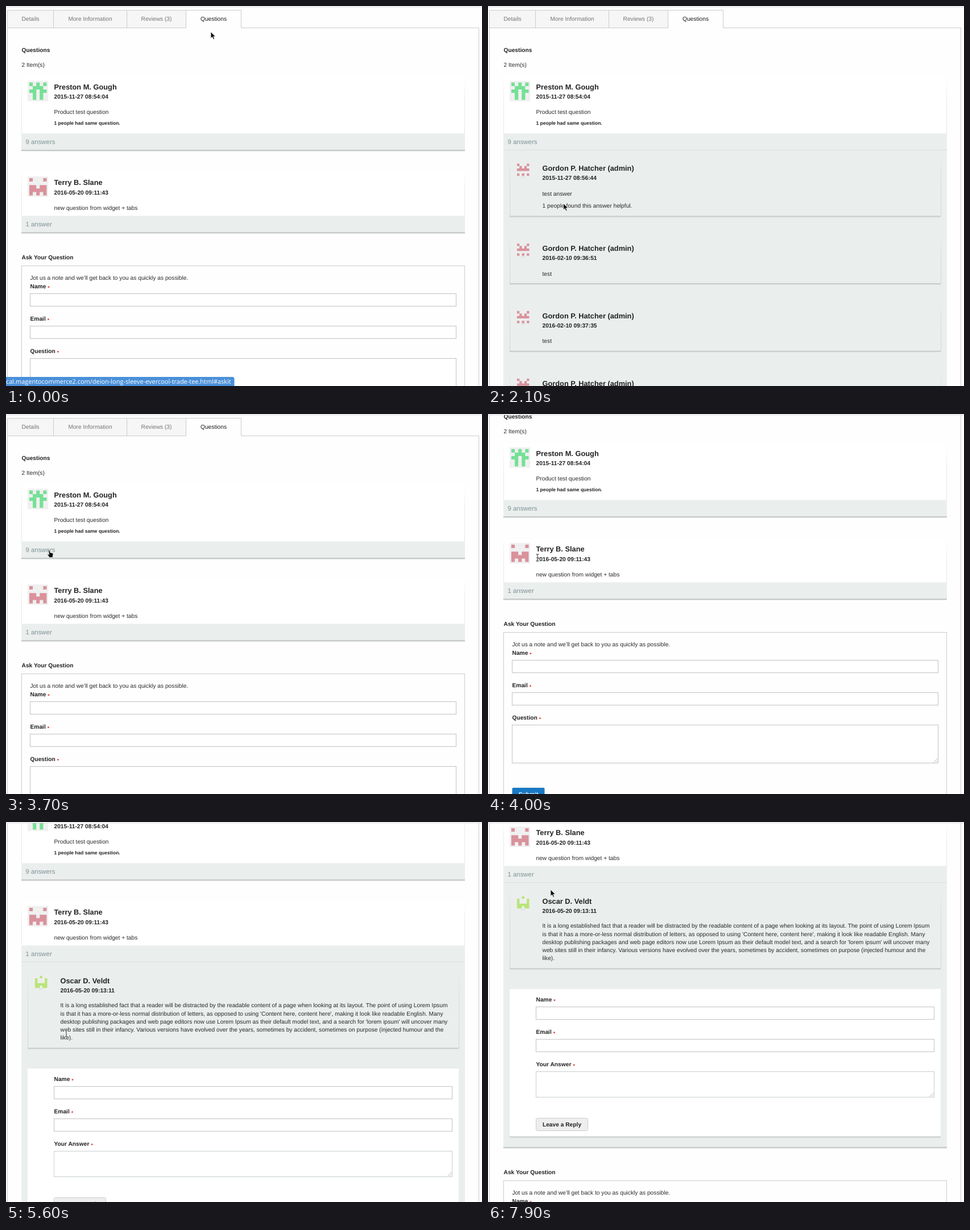
An HTML page for the animation above (8 s loop, 837 by 669 pixels).

```html
<!DOCTYPE html>
<html lang="en">
<head>
<meta charset="utf-8">
<title>Product questions</title>
<style>
html, body { margin: 0; width: 100%; height: 100%; overflow: hidden; background: #fefefe; }
svg { display: block; width: 100%; height: 100%; }
text { font: 10.23px "Liberation Sans", Arial, sans-serif; fill: #2b2b2b; text-rendering: geometricPrecision; white-space: pre; }
.b { font-weight: 700; fill: #222; }
.name { font-size: 12.8px; font-weight: 700; fill: #222; }
.small { font-size: 8.5px; font-weight: 700; fill: #222; }
.bar { font-size: 11.4px; fill: #7f9295; }
.tab { fill: #757575; }
.on { fill: #1c1c1c; }
.white { fill: #fff; font-weight: 700; }
.url { font: 10.96px "Open Sans", "Noto Sans", sans-serif; fill: #fff; }
.star { font-size: 8.8px; fill: #e02b27; }
.field { fill: #fff; stroke: #c2c2c2; }
</style>
</head>
<body>
<svg id="stage" viewBox="0 0 837 669" preserveAspectRatio="none"></svg>
<script>
const PANEL = '#eaeeed';
const OPEN_1 = 1390, OPEN_2 = 466, LOOP = 8000;

const rect = (x, y, w, h, fill, extra = '') =>
  `<rect x="${x}" y="${y}" width="${w}" height="${h}" fill="${fill}" ${extra}/>`;
const text = (x, y, s, cls = '', extra = '') =>
  `<text x="${x}" y="${y}" class="${cls}" ${extra}>${s}</text>`;
const line = (d, color) => `<path d="${d}" fill="none" stroke="${color}"/>`;

// Pixel avatar built from five rows of five cells
function avatar(x, y, cell, rows, color) {
  let d = '';
  rows.split('/').forEach((row, j) => [...row].forEach((c, i) => {
    if (c === 'X') d += `M${x + i * cell} ${y + j * cell}h${cell}v${cell}h${-cell}z`;
  }));
  return `<path d="${d}" fill="${color}"/>`;
}
const ICONS = {
  arch: ['X.X.X/.XXX./XX.XX/.X.X./.X.X.', '#75e096'],
  mask: ['X...X/...../XX.XX/XXXXX/X.X.X', '#d9929c'],
  crab: ['X...X/.X.X./XXXXX/...../X.X.X', '#d9929c'],
  fort: ['..X../X...X/X...X/XXXXX/XX.XX', '#b9e577']
};

const shade = (x1, x2, y, h) =>
  rect(x1, y, 1, h, 'url(#side)') + rect(x2 - 1, y, 1, h, 'url(#side)');
const shadow = (x, y, w) =>
  rect(x, y - 1, w, 2, '#c6cac9') + rect(x, y + 1, w, 1, '#e3e5e4');

function label(x, y, s) {
  return text(x, y, `${s}<tspan class="star" dx="3" dy="2">*</tspan>`, 'b');
}
function field(x, y, w, h, color = '#c2c2c2') {
  return `<rect x="${x}" y="${y}" width="${w}" height="${h}" class="field" style="stroke:${color}"/>`;
}
function area(x, y, w, h, color) {
  const r = x + w - 1, b = y + h - 1;
  return field(x, y, w, h, color) + line(`M${r - 7} ${b}l7 -7M${r - 3} ${b}l3 -3`, '#bbb');
}

function question(y, name, date, body, icon, barY, count) {
  return rect(27, y, 780, barY - y, '#fff') + shade(27, 807, y, barY - y) +
    rect(38, y + 7, 36, 36, '#f0f0f0') + avatar(41, y + 10, 6.1, ...ICONS[icon]) +
    text(84.5, y + 22.2, name, 'name') + text(84.5, y + 38.5, date, 'b') + body +
    rect(27, barY, 780, 30, PANEL) + text(34.5, barY + 18.7, count, 'bar') +
    rect(27, barY + 29, 780, 1, '#d0d5d4');
}

function answer(nameY, bottom, name, date, icon, lines) {
  const top = nameY - 24;
  return shade(38, 797, top, bottom - top) + rect(47, nameY - 16, 29, 29, '#eceeee') +
    avatar(51, nameY - 13, 4.3, ...ICONS[icon]) + rect(58, nameY + 10, 7, 1, '#d2d6d5') +
    text(95.5, nameY - .3, name, 'name') + text(95.5, nameY + 15.8, date, 'b') +
    lines.map(([dy, s]) => text(95.5, nameY + dy, s)).join('') + shadow(38, bottom, 758);
}

function tabs() {
  const names = ['Details', 'More Information', 'Reviews (3)'], xs = [2.5, 83.5, 212.5, 316.5];
  return names.map((s, i) =>
    rect(xs[i], 7.5, xs[i + 1] - xs[i], 31, '#f6f6f6', 'stroke="#ccc"') +
    text((xs[i] + xs[i + 1]) / 2, 26, s, 'tab', 'text-anchor="middle"')).join('') +
    line('M2.5 1500V38.5H316.5V7.5H413.5V38.5H831.5V1500', '#ccc') +
    text(365, 26, 'Questions', 'on', 'text-anchor="middle"');
}

function answers1() {
  const dates = ['2015-11-27 08:56:44', '2016-02-10 09:36:51', '2016-02-10 09:37:35', '2016-02-10 09:38:12'];
  return rect(27, 254, 780, OPEN_1, PANEL) + dates.map((date, i) => {
    const y = i ? 312.5 + 118.8 * i : 290.5;
    const lines = i ? [[43.3, 'test']] : [[43, 'test answer'], [64.7, '1 people found this answer helpful.']];
    return answer(y, y + (i ? 57.8 : 80), 'Gordon P. Hatcher (admin)', date, 'crab', lines);
  }).join('');
}

function answers2() {
  const lines = [
    'It is a long established fact that a reader will be distracted by the readable content of a page when looking at its layout. The point of using Lorem Ipsum',
    "is that it has a more-or-less normal distribution of letters, as opposed to using 'Content here, content here', making it look like readable English. Many",
    "desktop publishing packages and web page editors now use Lorem Ipsum as their default model text, and a search for 'lorem ipsum' will uncover many",
    'web sites still in their infancy. Various versions have evolved over the years, sometimes by accident, sometimes on purpose (injected humour and the',
    'like).'
  ].map((s, i) => [42.5 + 14.25 * i, s]);
  return rect(27, 399, 780, OPEN_2, PANEL) +
    answer(435.8, 550.5, 'Oscar D. Veldt', '2016-05-20 09:13:11', 'fort', lines) +
    rect(38, 586, 758, 260, '#fff') + shadow(38, 846.5, 758) +
    label(84.5, 607.5, 'Name') + field(84.5, 617.5, 700, 22) +
    label(84.5, 664.8, 'Email') + field(84.5, 674.5, 700, 22) +
    label(84.5, 722, 'Your Answer') + area(84.5, 731.5, 700, 45, '#c6d0ce') +
    `<rect id="reply" x="84.5" y="813.5" width="91" height="22" rx="2" stroke="#ccc"/>` +
    text(130, 828, 'Leave a Reply', 'b', 'text-anchor="middle"');
}

function askForm() {
  return shadow(27, 399, 780) + text(27.5, 445.8, 'Ask Your Question', 'b') +
    rect(27.5, 457.5, 779, 330, 'none', 'stroke="#ccc"') +
    text(42.5, 482.3, 'Jot us a note and we’ll get back to you as quickly as possible.') +
    label(42.5, 496.6, 'Name') + field(42.5, 506.5, 749, 22) +
    label(42.5, 554, 'Email') + field(42.5, 563.5, 749, 22) +
    label(42.5, 611, 'Question') + area(42.5, 620.5, 749, 67) +
    rect(42.5, 731, 57, 24, '#1979c3', 'rx="2"') +
    text(71, 746, 'Submit', 'white', 'text-anchor="middle"');
}

const clip = (id, y) =>
  `<clipPath id="${id}"><rect x="0" y="${y}" width="837" height="0"/></clipPath>`;

document.getElementById('stage').innerHTML = `
<defs>
  <linearGradient id="side" x2="0" y2="1">
    <stop offset="0" stop-color="#000" stop-opacity="0"/>
    <stop offset=".4" stop-color="#000" stop-opacity=".08"/>
    <stop offset="1" stop-color="#000" stop-opacity=".09"/>
  </linearGradient>
  ${clip('clip1', 254)}${clip('clip2', 399)}
</defs>
${rect(0, 0, 837, 669, '#fefefe')}
<g id="page">
  ${tabs()}
  ${text(27.5, 81, 'Questions', 'b')}${text(27.5, 107, '2 Item(s)')}
  ${question(124.8, 'Preston M. Gough', '2015-11-27 08:54:04',
    text(84.5, 189.7, 'Product test question') + text(84.5, 208.8, '1 people had same question.', 'small'),
    'arch', 224.5, '9 answers')}
  <g clip-path="url(#clip1)">${answers1()}</g>
  <g id="below1">
    ${shadow(27, 254, 780)}
    ${question(293, 'Terry B. Slane', '2016-05-20 09:11:43',
      text(84.5, 358.6, 'new question from widget + tabs'), 'mask', 369.5, '1 answer')}
    <g clip-path="url(#clip2)">${answers2()}</g>
    <g id="below2">${askForm()}</g>
  </g>
</g>
${rect(0, 0, 837, 1, '#fefefe')}${rect(0, 1, 837, 1, '#d8d8d8')}
<g id="status">
  <path d="M0 653H398q3.500 0 3.500 3.500V669H0z" fill="#4a90d9"/>
  ${text(0, 665, 'cal.magentocommerce2.com/deion-long-sleeve-evercool-trade-tee.html#askit', 'url')}
</g>
<g id="cursor" stroke-linejoin="round">
  <path id="arrow" d="M0 0V11.500L2.700 9L4.600 13.300L6.600 12.400L4.800 8.300H8.500z" fill="#111" stroke="#fff" stroke-width=".8"/>
  <path id="hand" d="M1.500 1.200q1.200 -1.600 2.300 .3l.9 3.300l4.300 1q1.300 .5 1.100 2.200l-.8 3.700v2H3.300l-3.300 -5q-.4 -1.700 1.200 -1.200l1.500 1.200z" fill="#111" stroke="#fff" stroke-width=".8"/>
  <g id="beam">
    <path d="M-2.500 -6H2.500M0 -6V6M-2.500 6H2.500" stroke="#fff" stroke-width="2.600"/>
    <path d="M-2.500 -6H2.500M0 -6V6M-2.500 6H2.500" stroke="#333" stroke-width="1.100"/>
  </g>
</g>`;

const $ = id => document.getElementById(id);
const clamp = v => Math.max(0, Math.min(1, v));
const swing = p => .5 - Math.cos(Math.PI * clamp(p)) / 2;
const easeOut = p => 1 - (1 - p) ** 3;

// time, x, y, pointer shape from that time on
const MOVES = [
  [0, 360, 45.5, 'arrow'], [50, 360, 45.5, 'arrow'], [600, 75, 228, 'hand'], [700, 54.5, 240.5, 'hand'],
  [1000, 54.5, 240.5, 'hand'], [1300, 65, 237.5, 'hand'], [1400, 65, 237.5, 'hand'],
  [1500, 104, 266, 'arrow'], [1600, 130, 291, 'arrow'], [2000, 130, 291, 'arrow'],
  [2400, 140, 517, 'arrow'], [2500, 138, 515, 'arrow'], [2900, 80, 262, 'arrow'],
  [3000, 78, 250, 'hand'], [3200, 71, 237.5, 'hand'], [3700, 73, 239, 'hand'],
  [3900, 84, 250, 'beam'], [4000, 87, 253, 'beam'], [4200, 95, 292, 'beam'],
  [4300, 88, 300, 'hand'], [4500, 73, 311, 'hand'], [5050, 73, 311, 'hand'],
  [5200, 78, 318, 'arrow'], [5400, 94, 350, 'beam'], [5600, 106, 372, 'beam'],
  [6000, 134, 398, 'beam'], [6300, 141, 482, 'beam'], [6400, 141, 482, 'beam'],
  [6600, 138, 523, 'hand'], [6900, 130, 527, 'hand'], [7300, 127, 526, 'hand'],
  [7500, 124, 480, 'beam'], [7600, 120, 370, 'arrow'], [7900, 110, 119, 'arrow'], [LOOP, 110, 119, 'arrow']
];
const SCROLL = [[0, 0], [3700, 0], [4000, 73], [5050, 73], [5400, 152], [5600, 152], [6000, 291], [6100, 292], [LOOP, 292]];

// Current and next key with the progress between them
function span(keys, t) {
  let i = 0;
  while (i < keys.length - 2 && keys[i + 1][0] <= t) i++;
  const a = keys[i], b = keys[i + 1];
  return [a, b, clamp((t - a[0]) / (b[0] - a[0]))];
}
const mix = (a, b, p) => a + (b - a) * p;
const shift = (id, x, y) => $(id).setAttribute('transform', `translate(${x} ${y})`);

function draw(t) {
  const h1 = OPEN_1 * (swing((t - 800) / 400) - swing((t - 3230) / 400));
  const h2 = OPEN_2 * swing((t - 4600) / 400);
  $('clip1').firstChild.setAttribute('height', h1);
  $('clip2').firstChild.setAttribute('height', h2);
  shift('below1', 0, h1);
  shift('below2', 0, h2);

  const [s0, s1, sp] = span(SCROLL, t);
  shift('page', 0, -Math.round(mix(s0[1], s1[1], easeOut(sp))));

  const [a, b, p] = span(MOVES, t);
  shift('cursor', mix(a[1], b[1], p), mix(a[2], b[2], p));
  for (const kind of ['arrow', 'hand', 'beam'])
    $(kind).style.display = kind === a[3] ? '' : 'none';
  $('reply').setAttribute('fill', t >= 6600 && t < 7400 ? '#e1e1e1' : '#eee');
  $('status').style.display = t < 100 ? '' : 'none';
}

const start = performance.now();
function tick() {
  const t = (performance.now() - start) % LOOP;
  draw(Math.floor(t / 100) * 100);
  requestAnimationFrame(tick);
}
tick();
</script>
</body>
</html>
```
